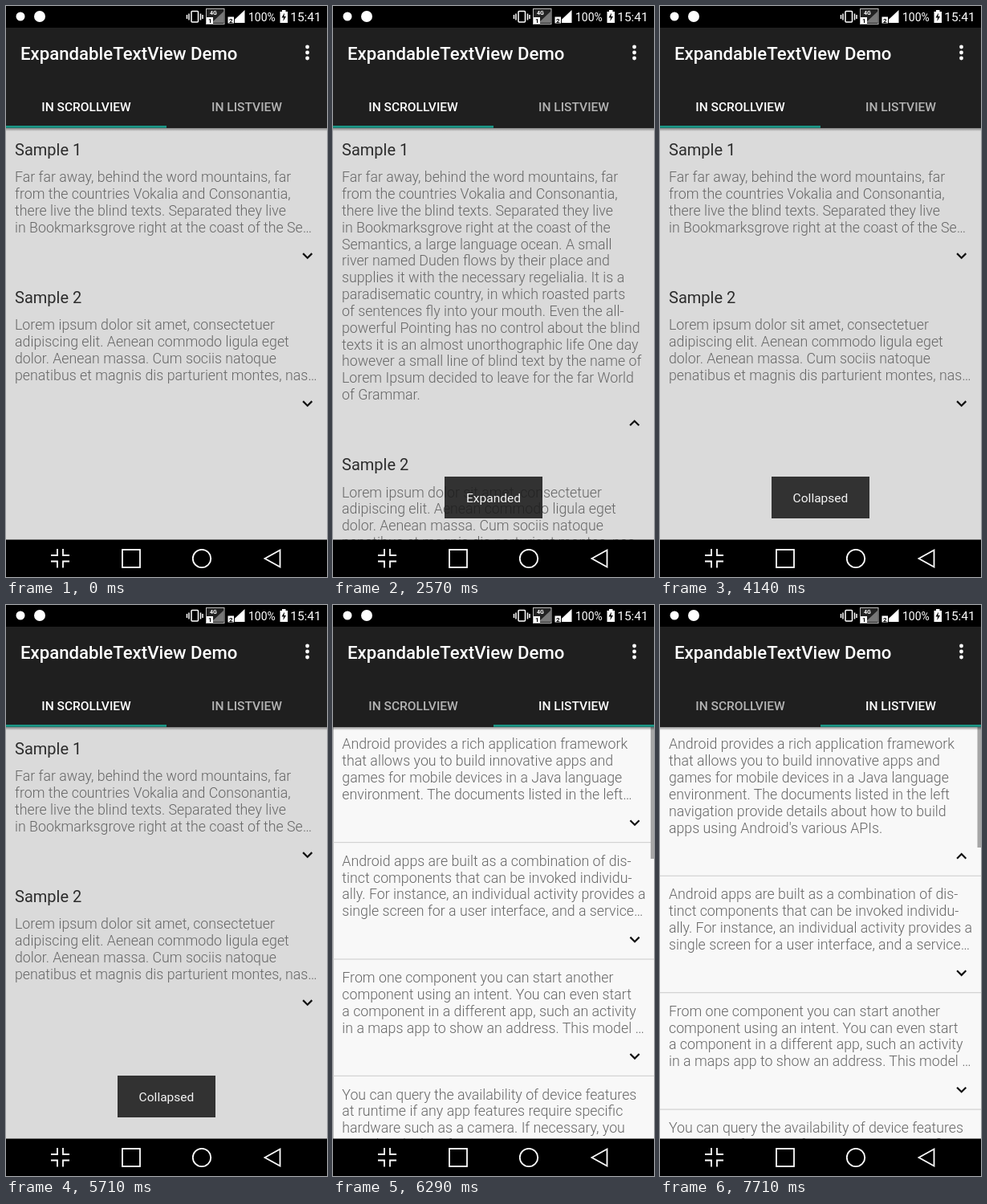
An HTML page that plays this animation: 400 by 711 pixels, repeating every 8 s.

```html
<!DOCTYPE html>
<html lang="en">
<head>
<meta charset="utf-8">
<title>Expandable text</title>
<style>
  html, body { margin: 0; width: 100%; height: 100%; overflow: hidden; background: #000; }
  svg { display: block; width: 100vw; height: 100vh; font-family: Roboto, sans-serif; }
  .body { font-size: 17.78px; font-weight: 300; fill: #666; }
  .head { font-size: 20px; fill: #2c2c2c; }
  .tab { font-size: 15.55px; font-weight: 500; text-anchor: middle; }
  .arrow { fill: none; stroke: #111; stroke-width: 2.2; }
</style>
</head>
<body>
<svg id="stage" viewBox="0 0 400 711">
  <defs>
    <linearGradient id="shade" x2="0" y2="1">
      <stop stop-color="#000" stop-opacity=".4"/>
      <stop offset="1" stop-color="#000" stop-opacity="0"/>
    </linearGradient>
  </defs>

  <g id="pager">
    <g id="scrollPage"><rect y="150" width="400" height="516" fill="#dadada"/></g>
    <g id="listPage" transform="translate(400)">
      <rect y="150" width="400" height="516" fill="#f8f8f8"/>
    </g>
  </g>

  <g id="toast">
    <rect x="139" y="586" width="122" height="52" fill="#1a1a1a" fill-opacity=".87"/>
    <text id="toastText" x="200" y="617.6" font-size="15.55" fill="#f4f4f4" text-anchor="middle"></text>
  </g>

  <rect y="152" width="400" height="4" fill="url(#shade)"/>
  <rect y="26" width="400" height="126" fill="#1f1f1f"/>
  <text x="18" y="66.5" font-size="22.2" font-weight="500" fill="#fff">ExpandableTextView Demo</text>
  <g fill="#fff">
    <circle cx="375.5" cy="51" r="2.4"/><circle cx="375.5" cy="58" r="2.4"/><circle cx="375.5" cy="65" r="2.4"/>
  </g>
  <text id="tab0" class="tab" x="100" y="130.6">IN SCROLLVIEW</text>
  <text id="tab1" class="tab" x="300" y="130.6">IN LISTVIEW</text>
  <rect id="marker" y="149" width="200" height="2.8" fill="#1b9585"/>

  <!-- status bar -->
  <rect width="400" height="27"/>
  <g fill="#fff">
    <circle cx="18" cy="13" r="5.5"/>
    <circle cx="42" cy="13" r="7"/>
    <g fill="none" stroke="#fff" stroke-width="1.5">
      <rect x="231" y="6.5" width="8.5" height="13.5" rx="1"/>
      <path d="M228 9.5v8M225.5 11v5M242.500 9.500v8M245 11v5"/>
    </g>
    <rect x="249.500" y="3.500" width="22.500" height="19" fill="#222" stroke="#bbb"/>
    <path d="M271 7v14h-15z" fill="#777"/>
    <text x="254" y="10.800" font-size="7" font-weight="700">4G</text>
    <rect x="250" y="14" width="8" height="8"/>
    <path d="M297.500 5v16h-17z"/>
    <rect x="276" y="13" width="8.500" height="9" stroke="#000"/>
    <g fill="#000" font-size="8" font-weight="700">
      <text x="252" y="21">1</text><text x="278" y="20.500">2</text>
    </g>
    <text x="302" y="19" font-size="14">100%</text>
    <path d="M341.500 7h2.500v-2h4.500v2h2.500v14h-9.500z"/>
    <path d="M347 8.500l-3.500 6h2.500l-.7 4.500 3.700-6h-2.500z" fill="#000"/>
    <text x="392.800" y="19.400" font-size="15.500" text-anchor="end">15:41</text>
  </g>

  <!-- navigation bar -->
  <rect y="664.500" width="400" height="46.500"/>
  <g fill="none" stroke="#fff" stroke-width="1.8">
    <path d="M56 684h8v-8M79 684h-8v-8M56 691.500h8v8M79 691.500h-8v8"/>
    <rect x="145" y="677" width="22" height="22"/>
    <circle cx="244" cy="688" r="11.200"/>
    <path d="M322.500 688l19-10.500v21z"/>
  </g>
</svg>
<script>
const $ = id => document.getElementById(id);
const LOOP = 8000, STEP = 1000 / 7;
const LINE = 20.84;
const OPEN = 1428, CLOSE = 3428, OPEN_ROW = 6714;
const TAP_LAG = 10, GROW = 300;
const PAGE_START = 6133.7, PAGE_TIME = 200;

const clamp = x => Math.min(1, Math.max(0, x));
const inOut = x => 0.5 - Math.cos(Math.PI * clamp(x)) / 2;
const quintOut = x => 1 - (1 - clamp(x)) ** 5;

function el(tag, attrs, parent, text) {
  const node = document.createElementNS('http://www.w3.org/2000/svg', tag);
  for (const k in attrs) node.setAttribute(k, attrs[k]);
  if (text) node.textContent = text;
  return parent.appendChild(node);
}

let clips = 0;

// Text of four visible lines with an arrow; `base` is the first baseline.
function expandable(parent, base, short, lines) {
  const id = 'clip' + clips++;
  const clip = el('clipPath', { id }, parent);
  const box = el('rect', { y: base - 18, width: 400 }, clip);
  const copy = el('g', { class: 'body', 'clip-path': `url(#${id})` }, parent);
  const rows = lines.map((s, i) => el('text', { x: 11, y: base + i * LINE }, copy, s));
  const arrow = el('path', { class: 'arrow' }, parent);
  const extra = (lines.length - 4) * LINE;

  // grown: 0..1 height, up: arrow direction, busy: still resizing
  return function set(grown, up, fade) {
    const d = extra * grown;
    box.setAttribute('height', 4 * LINE + 3 + d);
    rows[3].textContent = up || grown > 0 ? lines[3] : short;
    copy.setAttribute('opacity', 0.7 + 0.3 * fade);
    const s = up ? -1 : 1;
    arrow.setAttribute('d', 'M-5.6 -2.9L0 2.7L5.6 -2.9');
    arrow.setAttribute('transform', `translate(375.7 ${base + 91.8 + d}) scale(1 ${s})`);
    return d;
  };
}

const scrollPage = $('scrollPage'), listPage = $('listPage');

el('text', { class: 'head', x: 11, y: 186 }, scrollPage, 'Sample 1');
const sample1 = expandable(scrollPage, 219.2, 'in Bookmarksgrove right at the coast of the Se…', [
  'Far far away, behind the word mountains, far',
  'from the countries Vokalia and Consonantia,',
  'there live the blind texts. Separated they live',
  'in Bookmarksgrove right at the coast of the',
  'Semantics, a large language ocean. A small',
  'river named Duden flows by their place and',
  'supplies it with the necessary regelialia. It is a',
  'paradisematic country, in which roasted parts',
  'of sentences fly into your mouth. Even the all-',
  'powerful Pointing has no control about the blind',
  'texts it is an almost unorthographic life One day',
  'however a small line of blind text by the name of',
  'Lorem Ipsum decided to leave for the far World',
  'of Grammar.'
]);
const below1 = el('g', {}, scrollPage);
el('text', { class: 'head', x: 11, y: 370 }, below1, 'Sample 2');
const montes = 'penatibus et magnis dis parturient montes, nas…';
expandable(below1, 403.2, montes, [
  'Lorem ipsum dolor sit amet, consectetuer',
  'adipiscing elit. Aenean commodo ligula eget',
  'dolor. Aenean massa. Cum sociis natoque',
  montes
])(0, false, 1);

const row1 = expandable(listPage, 179.3, 'environment. The documents listed in the left…', [
  'Android provides a rich application framework',
  'that allows you to build innovative apps and',
  'games for mobile devices in a Java language',
  'environment. The documents listed in the left',
  'navigation provide details about how to build',
  "apps using Android's various APIs."
]);
const belowRow = el('g', {}, listPage);
[
  ['Android apps are built as a combination of dis-',
   'tinct components that can be invoked individu-',
   'ally. For instance, an individual activity provides a',
   'single screen for a user interface, and a service…'],
  ['From one component you can start another',
   'component using an intent. You can even start',
   'a component in a different app, such an activity',
   'in a maps app to show an address. This model …'],
  ['You can query the availability of device features',
   'at runtime if any app features require specific',
   'hardware such as a camera. If necessary, you',
   'can also declare features your app requires so…']
].forEach((lines, i) => {
  const y = 145.4 * i;
  el('rect', { y: 295 + y, width: 400, height: 1.2, fill: '#d2d2d2' }, belowRow);
  expandable(belowRow, 324.7 + y, lines[3], lines)(0, false, 1);
});
const thumb = el('rect', { x: 395.5, y: 152, width: 4.5, fill: '#a6a6a6' }, listPage);

function toastAt(t) {
  if (t < 3900) return ['Expanded', clamp((t - 1780) / 400) * (1 - clamp((t - 3750) / 250))];
  return ['Collapsed', clamp((t - 3850) / 250) * (1 - clamp((t - 5900) / 200))];
}

function draw(t) {
  const since = tap => inOut((t - tap - TAP_LAG) / GROW);

  const open = t >= OPEN && t < CLOSE;
  const e = t < CLOSE ? since(OPEN) : since(CLOSE);
  const d = sample1(t < CLOSE ? e : 1 - e, open, t < OPEN ? 1 : e);
  below1.setAttribute('transform', `translate(0 ${d})`);

  const grown = since(OPEN_ROW), tapped = t >= OPEN_ROW;
  const shift = row1(grown, tapped, tapped ? grown : 1);
  belowRow.setAttribute('transform', `translate(0 ${shift})`);
  thumb.setAttribute('height', 164 - 14 * grown);

  const page = quintOut((t - PAGE_START) / PAGE_TIME);
  $('pager').setAttribute('transform', `translate(${-400 * page})`);
  const second = page > 0;
  $('tab0').setAttribute('fill', second ? '#b4b4b4' : '#fff');
  $('tab1').setAttribute('fill', second ? '#fff' : '#b4b4b4');
  $('marker').setAttribute('x', page > 0.5 ? 200 : 0);

  const [label, alpha] = toastAt(t);
  $('toastText').textContent = label;
  $('toast').setAttribute('opacity', alpha);
}

const start = performance.now();
function tick() {
  const t = (performance.now() - start) % LOOP;
  draw(Math.floor((t + 4) / STEP) % 56 * STEP);
  requestAnimationFrame(tick);
}
tick();
</script>
</body>
</html>
```
